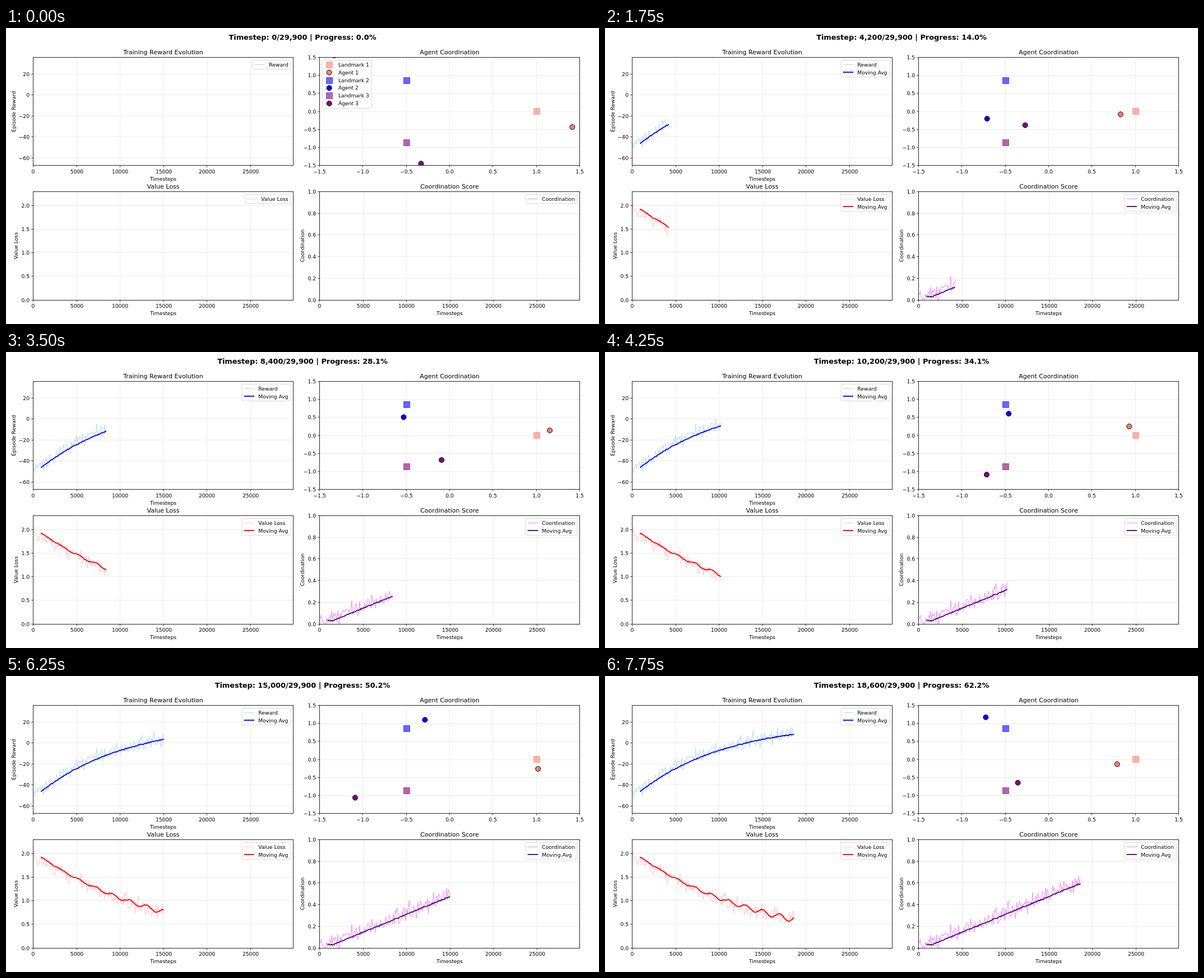
Animation, 1058 px wide and 529 px high, one loop 8 s. Source, as an HTML page:

```html
<!DOCTYPE html>
<html lang="en">
<head>
<meta charset="utf-8">
<title>Training dashboard</title>
<style>
html, body { margin: 0; width: 100%; height: 100%; overflow: hidden; background: #fff; }
svg { display: block; width: 100%; height: 100%; font-family: "DejaVu Sans", sans-serif; font-size: 9.2px; }
</style>
</head>
<body>
<svg id="stage" viewBox="0 0 1058 529"></svg>
<script>
const STEP_MS = 250, STEPS = 32, PER_STEP = 600, TOTAL = 29900;
const W = 464, H = 193.4, WINDOW = 9;
const stage = document.getElementById("stage");
const range = (from, to, by) => Array.from({ length: Math.round((to - from) / by) + 1 }, (_, i) => from + i * by);
const timeTicks = range(0, 25000, 5000);

// trend(n): the moving average at sample n, one sample per 100 timesteps.
const charts = [
  { x: 48.5, y: 52.5, bottom: 245.5, title: "Training Reward Evolution", yLabel: "Episode Reward", labelX: 17.5,
    min: -67.4, max: 36.1, ticks: range(-60, 20, 20), name: "Reward", legend: [68, 87],
    raw: "lightblue", avg: "#00f", noise: 10, seed: 11,
    trend: n => 20 - 66.5 * Math.exp((9 - n) / 101) },
  { x: 48.5, y: 292.5, bottom: 486.5, title: "Value Loss", yLabel: "Value Loss", labelX: 21.5,
    min: 0, max: 2.295, ticks: range(0, 2, 0.5), digits: 1, name: "Value Loss", legend: [82, 87],
    raw: "pink", avg: "#f00", noise: 0.22, seed: 29,
    trend: n => 1.93 * Math.exp((9 - n) / 151) + n / 3000 * Math.cos((n - 150) / 3.1) },
  { x: 559.5, y: 292.5, bottom: 486.5, title: "Coordination Score", yLabel: "Coordination", labelX: 532.5,
    min: 0, max: 1, ticks: range(0, 1, 0.2), digits: 1, name: "Coordination", legend: [92, 92],
    raw: "violet", avg: "indigo", noise: 0.11, seed: 47,
    trend: n => Math.max(0.03, 0.0033 * n - 0.02) }
];
const scatter = { x: 559.5, y: 52.5, bottom: 245.5, title: "Agent Coordination", min: -1.5, max: 1.5,
  ticks: range(-1.5, 1.5, 0.5), digits: 1 };
const colors = ["salmon", "blue", "purple"];
// Key poses: step, then x, y of each agent
const poses = [
  [0, 1.415, -0.43, -1.33, 1.555, -0.33, -1.445],
  [7, 0.83, -0.08, -0.71, -0.2, -0.27, -0.38],
  [11, 1.38, 0.03, -0.6, 0.41, 0.53, -0.275],
  [17, 0.93, 0.25, -0.46, 0.605, -0.715, -1.085],
  [21, 1.1, -0.635, -0.38, 0.79, -0.8, -1.75],
  [25, 1.02, -0.26, -0.285, 1.1, -1.09, -1.06],
  [31, 0.79, -0.13, -0.725, 1.17, -0.355, -0.645]
];

const hash = n => { const s = Math.sin(n * 127.1) * 43758.5453; return s - Math.floor(s); };
const noise = n => hash(n) + hash(n * 3 + 500) - 1;
const px = t => t / TOTAL * W;
const py = (c, v) => c.y + (c.max - v) / (c.max - c.min) * H;
const sx = v => scatter.x + (v + 1.5) / 3 * W;
const snap = v => Math.floor(v + 0.5) + 0.5;
const label = (v, digits = 0) => v.toFixed(digits).replace("-", "\u2212");

const text = (x, y, s, anchor = "middle", extra = "") =>
  `<text x="${x}" y="${Math.round(y)}" text-anchor="${anchor}" ${extra}>${s}</text>`;
const line = (x1, y1, x2, y2, color, width = 0.75) =>
  `<path d="M${x1} ${y1}L${x2} ${y2}" stroke="${color}" stroke-width="${width}"/>`;
const polyline = (points, color, width) =>
  `<polyline points="${points.join(" ")}" fill="none" stroke="${color}" stroke-width="${width}" stroke-linejoin="round"/>`;
const legendBox = (x, y, w, h) =>
  `<rect x="${x}" y="${y}" width="${w}" height="${h}" rx="2" fill="#fff" fill-opacity=".8" stroke="#ccc" stroke-opacity=".8" stroke-width=".92"/>`;
const square = (x, y, color) =>
  `<rect x="${snap(x - 5.5)}" y="${snap(y - 5.75)}" width="11" height="11" fill="${color}" fill-opacity=".6" stroke="${color}" stroke-opacity=".6" stroke-width=".92"/>`;
const dot = (x, y, color) =>
  `<circle cx="${x}" cy="${y}" r="4.5" fill="${color}" stroke="#000" stroke-width="1"/>`;
const clipped = (c, content) => {
  const h = c.bottom - c.y;
  return `<svg x="${c.x}" y="${c.y}" width="${W}" height="${h}" viewBox="${c.x} ${c.y} ${W} ${h}">${content}</svg>`;
};

function axes(c, ticks, toX, digits) {
  let grid = "", marks = "";
  for (const t of ticks) {
    const x = snap(toX(t) - 0.5);
    grid += line(x, c.y, x, c.bottom, "#e6e6e6");
    marks += line(x, c.bottom, x, c.bottom + 3.3, "#000") + text(x, c.y + 207.5, label(t, digits));
  }
  for (const v of c.ticks) {
    const y = v === c.min ? c.bottom : snap(py(c, v) - 0.5);
    grid += line(c.x, y, c.x + W, y, "#e6e6e6");
    marks += line(c.x - 3.3, y, c.x, y, "#000") + text(c.x - 6.5, y + 3.4, label(v, c.digits), "end");
  }
  marks += `<rect x="${c.x}" y="${c.y}" width="${W}" height="${c.bottom - c.y}" fill="none" stroke="#000" stroke-width=".85"/>` +
    text(c.x + W / 2, c.y - 5.5, c.title, "middle", 'font-size="11"');
  return { grid, marks };
}

for (const c of charts) {
  const indices = range(0, (STEPS - 1) * PER_STEP / 100, 1);
  const point = (n, v) => `${(c.x + px(n * 100)).toFixed(2)},${py(c, v).toFixed(2)}`;
  c.rawPoints = indices.map(n => point(n, Math.max(c.min, c.trend(n + WINDOW / 2) + noise(n + c.seed) * c.noise)));
  c.avgPoints = indices.map(n => point(n, c.trend(n) + noise(n + c.seed + 900) * c.noise * 0.06));
  const middle = c.y + H / 2;
  c.axes = axes(c, timeTicks, t => c.x + px(t));
  c.axes.marks += text(c.x + W / 2, c.y + 220.5, "Timesteps") +
    text(c.labelX, middle, c.yLabel, "middle", `transform="rotate(-90 ${c.labelX} ${middle})"`);
}
scatter.axes = axes(scatter, scatter.ticks, sx, 1);

function drawChart(c, step) {
  const last = step * PER_STEP / 100;
  const averaged = last >= WINDOW;
  const width = c.legend[+averaged], x = c.x + W - 4.5 - width, y = c.y + 5;
  const row = (dy, color, w, s) =>
    line(x + 3.7, y + dy, x + 22, y + dy, color, w) + text(x + 29.3, y + dy + 3.5, s, "start");
  let lines = polyline(c.rawPoints.slice(0, last + 1), c.raw, 0.92);
  let legend = legendBox(x, y, width, averaged ? 30 : 16) + row(8, c.raw, 0.92, c.name);
  if (averaged) {
    lines += polyline(c.avgPoints.slice(WINDOW, last + 1), c.avg, 1.84);
    legend += row(21.5, c.avg, 1.84, "Moving Avg");
  }
  return c.axes.grid + clipped(c, lines) + c.axes.marks + legend;
}

function poseAt(step) {
  const i = Math.max(1, poses.findIndex(p => p[0] >= step));
  const [from, to] = [poses[i - 1], poses[i]];
  const f = (step - from[0]) / (to[0] - from[0]);
  return from.slice(1).map((v, k) => v + (to[k + 1] - v) * f);
}

function drawScatter(step) {
  const pose = poseAt(step);
  let marks = "", legend = "";
  colors.forEach((color, i) => {
    const angle = i * Math.PI * 2 / 3, top = 65.7 + i * 27.7;
    marks += square(sx(Math.cos(angle)), py(scatter, Math.sin(angle)), color) +
      dot(sx(pose[i * 2]), py(scatter, pose[i * 2 + 1]), color);
    legend += square(576.7, top, color) + text(593, top + 3.3, `Landmark ${i + 1}`, "start") +
      dot(576.7, top + 13.8, color) + text(593, top + 17, `Agent ${i + 1}`, "start");
  });
  return scatter.axes.grid + clipped(scatter, marks) + scatter.axes.marks +
    (step ? "" : legendBox(564.3, 57.5, 88, 86) + legend);
}

let shown = -1;
function render(now) {
  const step = Math.floor(now / STEP_MS) % STEPS;
  if (step === shown) return;
  shown = step;
  const t = step * PER_STEP;
  const heading = `Timestep: ${t.toLocaleString("en-US")}/29,900 | Progress: ${(t / TOTAL * 100).toFixed(1)}%`;
  stage.innerHTML = text(529, 21, heading, "middle", 'font-size="12.86" font-weight="bold"') +
    charts.map(c => drawChart(c, step)).join("") + drawScatter(step);
}
const start = performance.now();
function tick() {
  render(performance.now() - start);
  requestAnimationFrame(tick);
}
tick();
</script>
</body>
</html>
```
